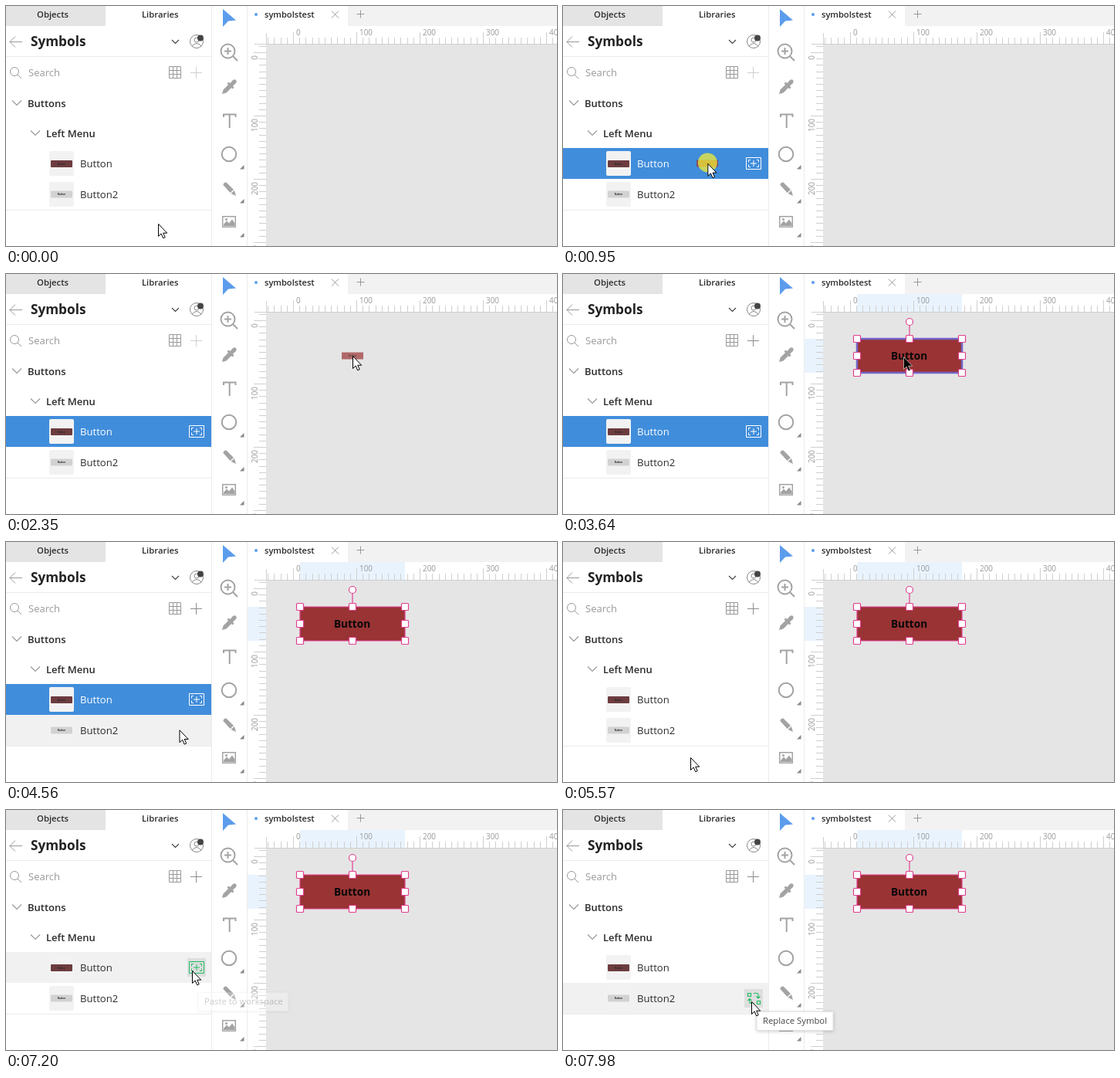
An HTML page that plays this animation: 714x311 px, repeating every 8 s.

```html
<!DOCTYPE html>
<html lang="en">
<head>
<meta charset="utf-8">
<title>Symbols panel</title>
<style>
html, body { margin: 0; width: 100%; height: 100%; overflow: hidden; background: #fff; }
svg { display: block; font: 13.1px "Open Sans", "Noto Sans", sans-serif; fill: #2b2b2b; }
.line { fill: none; stroke: #999; }
.semi { font-weight: 600; }
.small { font-size: 11.3px; }
.tiny { font-size: 3px; font-weight: 700; text-anchor: middle; }
.num { font-size: 9.9px; fill: #999; }
.tool { fill: none; stroke: #a3a3a3; stroke-width: 2; }
.solid { fill: #a3a3a3; }
.handle { fill: #fff; stroke: #e0408f; stroke-width: 1.2; }
</style>
</head>
<body>
<svg width="714" height="311" viewBox="0 0 714 311">
  <!-- library panel -->
  <path fill="#e4e4e4" d="M0 0H129V26H0z"/>
  <g class="small semi">
    <text x="40" y="15">Objects</text>
    <text x="176" y="15">Libraries</text>
  </g>
  <path class="line" d="M21 46.500H5M12 39.500l-7 7 7 7"/>
  <text x="32" y="52" font-size="17.200" font-weight="700" fill="#222">Symbols</text>
  <path class="line" style="stroke:#444" stroke-width="1.200" d="M215 44l4.500 4.500L224 44"/>
  <g class="line" style="stroke:#888">
    <circle cx="247" cy="46" r="8.500"/><circle cx="247" cy="44" r="3"/>
    <path d="M241 52q6-7 12 0"/>
  </g>
  <circle cx="252" cy="41.500" r="4" fill="#444"/>
  <path class="line" style="stroke:#ececec" d="M0 65.500H266M0 264.500H266M266.500 0V311M312.500 0V311"/>
  <circle class="line" cx="11" cy="85" r="5.500"/>
  <path class="line" d="M15 89l5 5"/>
  <text x="29" y="91" font-size="13" fill="#999">Search</text>
  <path class="line" d="M211.500 78.500h15v15h-15zM216.500 78.500v15M221.500 78.500v15M211.500 83.500h15M211.500 88.500h15"/>
  <path id="add" class="line" d="M239 86.500h15M246.500 79v15"/>
  <path class="line" stroke-width="1.200" d="M8 122.500l6 6 6-6M32 161.500l6 6 6-6"/>
  <g class="semi" font-size="13">
    <text x="28" y="131">Buttons</text>
    <text x="52" y="170">Left Menu</text>
  </g>
  <path id="row1" d="M0 184H266V224H0z"/>
  <path id="row2" d="M0 224H266V264H0z"/>
  <rect x="56" y="188" width="32" height="32" rx="2" fill="#f2f2f2"/>
  <rect x="56" y="228" width="32" height="32" rx="2" fill="#f2f2f2"/>
  <rect x="58" y="200" width="28" height="9" rx="1" fill="#6d3c3f"/>
  <rect x="58" y="239.500" width="28" height="9" rx="1" fill="#d2d2d2"/>
  <text class="tiny" x="72" y="205.500">Button</text>
  <text class="tiny" x="72" y="245">Button</text>
  <text id="label1" x="96" y="209">Button</text>
  <text x="96" y="249">Button2</text>
  <path id="pad" fill="#dedede"/>
  <g id="paste" fill="none">
    <path d="M237.500 196.500h19v15h-19z"/>
    <path d="M243 199.500h-2.500v3M251 199.500h2.500v3M243 208.500h-2.500v-3M251 208.500h2.500v-3M243 204h8M247 200v8"/>
  </g>
  <g id="swap" fill="none" stroke="#20bd62" stroke-width="1.200">
    <path d="M239.500 237.500h4v4h-4zM251.500 247.500h4v4h-4zM247 237.500h4q2 0 2 2v4M250.500 241.500l2.500 2.500 2.500-2.500M248 250.500h-4q-2 0-2-2v-3M239.500 247l2.500-2.500 2.500 2.500"/>
  </g>

  <!-- toolbar -->
  <path fill="#5c9cec" d="M281 4V27L288 19.500 298 18.500z"/>
  <g class="tool">
    <circle cx="287.500" cy="58.500" r="9"/>
    <path d="M294 65l6 6M283 58.500h9M287.500 54v9"/>
    <path d="M282 144v-3.500h15.500V144M289.700 141v17"/>
    <circle cx="289" cy="192" r="9.300"/>
    <path stroke-width="1.500" d="M280.700 272.700h16.600v13.600h-16.600z"/>
  </g>
  <g class="solid">
    <path d="M280 114l1.500-5.500 7-7 4 4-7 7zM286.500 100.500l2-2 2 1.500 3.500-4q2.500-1.500 4 0 1.500 1.500 0 4l-4 3.500 1.500 2-2 2z"/>
    <path d="M281.500 232q0-3.500 4-3.500L295 238 290.500 242zM291.500 243l4.500-4 2 7z"/>
    <path d="M282 285v-2l4-4.500 3 3 4-5 3.500 5v3.500z"/>
    <circle cx="285.500" cy="276.500" r="1.500"/>
    <path fill="#888" d="M308.500 206v5.500h-5.500zM308.500 250v5.500h-5.500zM308.500 294v5.500h-5.500z"/>
  </g>

  <!-- document -->
  <path fill="#f2f2f2" d="M443 0H714V26H443z"/>
  <circle cx="324" cy="11" r="2" fill="#5c9cec"/>
  <text class="semi" x="335" y="15" font-size="11.100">symbolstest</text>
  <path class="line" d="M422 6.500l9 9M431 6.500l-9 9M454.500 10.500h10M459.500 5.500v10"/>
  <path id="range" fill="#e9f3fd" d="M381 26H517V50H381zM313 84H337V128H313z"/>
  <g id="ruler"></g>
  <path fill="#e5e5e5" d="M337 50H714V311H337z"/>
  <g id="shape">
    <path fill="#993334" d="M381 84H517V128H381z"/>
    <text x="448.500" y="111" font-size="13.600" font-weight="700" text-anchor="middle" fill="#080808">Button</text>
    <path id="outline" fill="none" d="M381 84H517V128H381z"/>
  </g>
  <g id="handles" class="handle">
    <path d="M449 84V66"/><circle cx="449" cy="62" r="4.500"/>
  </g>

  <!-- pointer layer -->
  <g id="drag">
    <path fill="#9c3434" fill-opacity=".7" d="M-14-4.500h28v9h-28z"/>
    <text class="tiny" y="1" fill-opacity=".6">Button</text>
  </g>
  <g id="tip">
    <rect id="tipBox" y=".5" height="24" rx="1" fill="#fff" stroke="#e2e2e2" style="filter:drop-shadow(0 1px 2px #0003)"/>
    <text id="tipText" class="small" x="8" y="16.300" fill="#444"></text>
  </g>
  <g id="pointer">
    <circle id="glow" cy="-1" r="12.500" fill="#fdf32c" fill-opacity=".7"/>
    <g id="drop">
      <path fill="none" stroke="#000" stroke-dasharray="1 1" d="M3.500 17v4.500h7M3 16.500h10v3"/>
      <path fill="#fff" stroke="#000" d="M10.500 19.500h10v10h-10zM15.500 22v5M13 24.500h5"/>
    </g>
    <path id="arrow" d="M.5.5v16l3.600-3.500 2.600 5.800 2.500-1.100-2.500-5.500h5z"/>
  </g>
</svg>
<script>
const $ = id => document.getElementById(id);
const set = (id, attrs) => {
  for (const k in attrs) $(id).setAttribute(k, attrs[k]);
};
const show = (id, on) => set(id, { opacity: +on });
const move = (id, x, y) => set(id, { transform: `translate(${x} ${y})` });
const clamp = v => Math.max(0, Math.min(1, v));

// Rulers: a tick every 10 units, 82 px per 100 units
let ticks = 'M337.5 35V50M322 49.500H714', numbers = '';
for (let i = -4; i < 43; i++) {
  const major = i % 10 == 0, x = Math.round(372 + i * 8.2), y = Math.round(60 + i * 8.2);
  if (x > 338) ticks += `M${x + .5} ${major ? 34 : 41}V50`;
  if (y > 50) ticks += `M${major ? 321 : 328} ${y + .5}H337`;
  if (major) numbers += `<text class="num" x="${x + 4}" y="38">${i * 10}</text>
    <text class="num" text-anchor="end" transform="translate(326 ${y + 4}) rotate(-90)">${i * 10}</text>`;
}
$('ruler').innerHTML = `<path class="line" style="stroke:#cfcfcf" d="${ticks}"/>${numbers}`;

for (const x of [381, 449, 517]) for (const y of [84, 106, 128])
  if (x != 449 || y != 106)
    $('handles').innerHTML += `<rect x="${x - 4.5}" y="${y - 4.5}" width="9" height="9" rx="1"/>`;

// Pointer path: time, x, y
const path = [
  [270, 197, 282], [350, 250, 180], [430, 320, 50], [490, 290, 2], [570, 215, 70],
  [690, 187, 204], [950, 187, 204], [1100, 235, 187], [1280, 341, 146], [1450, 405, 122],
  [1740, 449, 106], [3270, 449, 106], [3330, 445, 106], [3500, 445, 106], [3640, 441, 107],
  [4140, 441, 107], [4400, 300, 200], [4690, 164, 278], [5009, 164, 278], [5010, 165, 279],
  [5580, 165, 279], [5930, 253, 261], [6540, 253, 261], [6820, 241, 208],
  [7509, 241, 208], [7510, 241, 213], [7760, 241, 213], [7860, 244, 248]
];
function pointerAt(t) {
  const n = path.findIndex(p => p[0] > t);
  if (n < 1) return path.at(n).slice(1);
  const [a, b] = [path[n - 1], path[n]], k = (t - a[0]) / (b[0] - a[0]);
  return [1, 2].map(i => a[i] + (b[i] - a[i]) * k);
}

// Tooltips: fade-in start, end, x, y, width, text
const tips = [
  [6050, 6530, 260, 274, 99, 'Replace Symbol'],
  [7165, 7760, 249, 236, 117, 'Paste to workspace'],
  [7840, 8000, 251, 261, 99, 'Replace Symbol']
];

function draw() {
  const t = performance.now() % 8000, [x, y] = pointerAt(t);
  const placed = t >= 2480, selected = t >= 950 && t < 5570;
  const inRow = top => x < 266 && y >= top && y < top + 40;
  const hover1 = inRow(184), hover2 = inRow(224), onIcon = x > 235;
  const overShape = placed && x > 381 && x < 517 && y > 84 && y < 128;

  set('row1', { fill: selected ? '#408ddb' : hover1 ? '#f1f1f1' : '#fff' });
  set('row2', { fill: hover2 ? '#f1f1f1' : '#fff' });
  set('label1', { fill: selected ? '#fff' : '#2b2b2b' });
  set('paste', { stroke: selected ? '#fff' : onIcon ? '#20bd62' : '#999' });
  show('paste', selected || hover1);
  show('swap', hover2 && !selected);
  show('pad', onIcon && !selected && (hover1 || hover2));
  set('pad', { d: `M235 ${hover1 ? 192 : 232}h24v24h-24z` });
  $('add').style.stroke = placed ? '#8e8e8e' : '#d0d0d0';

  show('range', placed);
  show('shape', placed);
  show('handles', t >= 2760);
  set('outline', { stroke: overShape ? '#7464c8' : '#e0408f', 'stroke-width': overShape ? 2.5 : 1.2 });

  const dragging = t >= 950 && t < 2350;
  show('drag', t >= 950 && !placed);
  move('drag', ...pointerAt(Math.max(950, t - 12)));
  show('glow', dragging);
  show('drop', dragging && t > 1040);
  move('pointer', x, y);
  const dark = overShape && t >= 2760;
  set('arrow', { fill: dark ? '#000' : '#fff', stroke: dark ? '#d8d8d8' : '#000', 'stroke-width': dark ? .7 : 1 });

  const tip = tips.find(p => t >= p[0] && t < p[1]);
  set('tip', { opacity: tip ? clamp((t - tip[0]) / 135) : 0 });
  if (tip) {
    move('tip', tip[2], tip[3]);
    set('tipBox', { width: tip[4] });
    $('tipText').textContent = tip[5];
  }
  requestAnimationFrame(draw);
}
draw();
</script>
</body>
</html>
```
